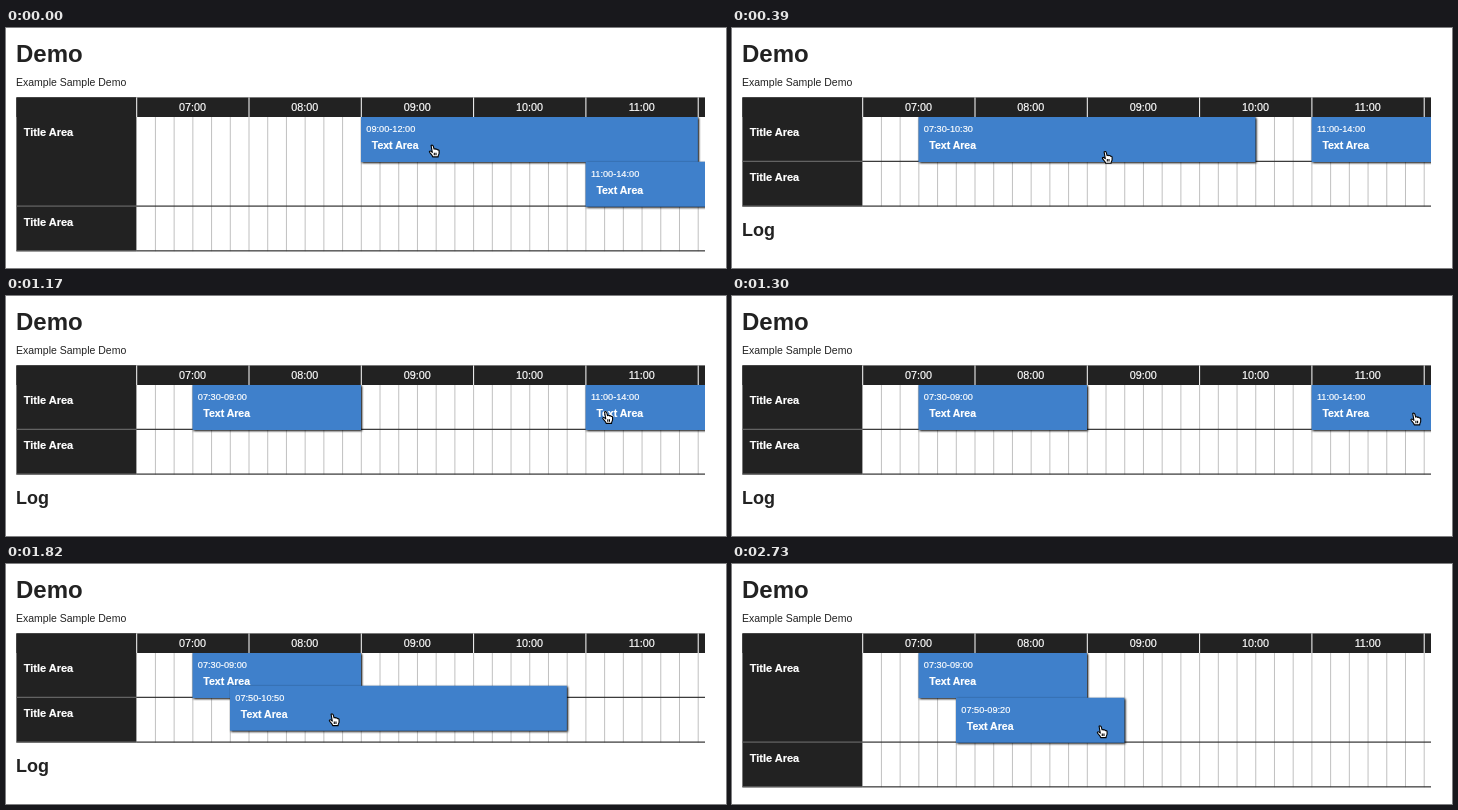
Animation of 720x240 px, one loop 2860 ms. Source, as an HTML page:

```html
<!DOCTYPE html>
<html lang="en">
<head>
<meta charset="utf-8">
<title>Schedule demo</title>
<style>
html, body { margin: 0; width: 100%; height: 100%; overflow: hidden; background: #fff; }
svg { display: block; font-family: "Liberation Sans", Arial, sans-serif; fill: #222; }
.bold { font-weight: bold; }
.white { fill: #fff; stroke: #fff; stroke-width: .2; }
.bar { fill: #3f80cb; filter: drop-shadow(1px 1.2px 1.3px #000); }
.hand { fill: #fff; stroke: #000; stroke-width: 1.1; stroke-linejoin: round; }
.resize { fill: #000; stroke: #fff; paint-order: stroke; }
</style>
</head>
<body>
<svg id="stage" width="720" height="240"></svg>
<script>
const stage = document.getElementById('stage');
const STEP = 130, STEPS = 22;
const LEFT = 10.4, GRID = 130.4, RIGHT = 699, HEAD = 69.4, TOP = 89;
const HOUR = 112.3, ROW = 44.75;

// Times are minutes after 07:00; from and to are steps of the loop.
const drags = [
  { bar: 0, from: 0, to: 2, by: -90, grab: 73, lift: 16, row: 0 },
  { bar: 0, from: 6, to: 8, by: -90, resize: true, row: 0 },
  { bar: 1, from: 10, to: 12, by: -170, grab: 104, lift: ROW, row: 1 },
  { bar: 1, from: 12, to: 14, by: -20, grab: 104, lift: -12, row: 0 },
  { bar: 1, from: 17.2, to: 20, by: -90, resize: true, row: 0 },
  { bar: 1, from: 21, to: 22, by: 0, grab: 146, row: 0 }
];

const snap = m => Math.round(m / 10) * 10;
const toX = m => GRID + m * HOUR / 60;
const two = v => String(v).padStart(2, '0');
const clock = m => two(7 + Math.floor(m / 60)) + ':' + two(m % 60);
const rect = (x, y, w, h, fill) =>
  `<rect x="${x}" y="${y}" width="${w}" height="${h}" fill="${fill}"/>`;
const text = (x, y, size, str, cls = '', anchor = 'start') =>
  `<text x="${x}" y="${y}" font-size="${size}" class="${cls}" text-anchor="${anchor}">${str}</text>`;

// Bars that overlap in one row are stacked, which makes the first row tall.
function settle(bars) {
  const [a, b] = bars;
  const tall = a.row === b.row && a.start < b.end && b.start < a.end;
  a.y = 0;
  b.y = tall || b.row ? ROW : 0;
  return tall;
}

function stateAt(n) {
  const bars = [{ start: 120, end: 300, row: 0 }, { start: 240, end: 420, row: 0 }];
  let tall = settle(bars);
  for (const d of drags) {
    if (n < d.from) break;
    const p = Math.min(1, (n - d.from) / (d.to - d.from)), bar = bars[d.bar];
    bar.end += d.by * p;
    if (!d.resize) bar.start += d.by * p;
    if (n <= d.to) {
      bar.y += (d.lift || 0) * p;
      break;
    }
    bar.row = d.row;
    tall = settle(bars);
  }
  return { bars, tall };
}

function grip(d, n) {
  const bar = stateAt(n).bars[d.bar];
  return d.resize
    ? { x: toX(bar.end), y: TOP + bar.y + 28 }
    : { x: toX(bar.start) + d.grab, y: TOP + bar.y + 34 };
}

// The pointer holds a bar while dragging and glides to the next grip otherwise.
function pointerAt(n) {
  const i = drags.findIndex(d => n <= d.to), next = drags[i];
  if (n >= next.from) return { ...grip(next, n), resize: next.resize };
  const last = drags[i - 1];
  const a = grip(last, last.to), b = grip(next, next.from);
  const p = (n - last.to) / (next.from - last.to), ease = 1 - (1 - p) ** 2;
  return { x: a.x + (b.x - a.x) * ease, y: a.y + (b.y - a.y) * ease };
}

function drawTable(rows, bottom) {
  let s = rect(LEFT, HEAD, RIGHT - LEFT, TOP - HEAD, '#222')
    + rect(LEFT, HEAD, GRID - LEFT, bottom - HEAD, '#222');
  for (let m = 10; toX(m) < RIGHT; m += 10)
    s += rect(toX(m) - .2, TOP, 1, bottom - TOP, '#c0c0c0');
  for (let m = 0; toX(m) < RIGHT; m += 60) {
    s += rect(toX(m) - .2, HEAD, 1, TOP - HEAD, '#fff');
    if (m < 300) s += text(toX(m + 30), 83, 10.8, clock(m), 'white', 'middle');
  }
  let y = TOP;
  for (const h of rows) {
    s += text(17.7, y + 19, 11, 'Title Area', 'bold white');
    y += h;
    s += rect(LEFT, y - 1, GRID - LEFT, 1.2, '#666')
      + rect(GRID, y - 1, RIGHT - GRID, 1.2, '#333');
  }
  return s;
}

function drawBar(bar) {
  const start = snap(bar.start), end = snap(bar.end);
  const x = toX(start), y = TOP + bar.y;
  return `<rect class="bar" x="${x}" y="${y}" width="${toX(end) - x}" height="45"/>`
    + text(x + 5.3, y + 15, 9.2, clock(start) + '-' + clock(end), 'white')
    + text(x + 10.8, y + 32, 10.5, 'Text Area', 'bold white');
}

function drawPointer({ x, y, resize }) {
  const shape = resize
    ? '<path class="resize" d="M-4-3h2v2h3v-2l4 3-4 3v-2h-3v2h-2z"/>'
    : '<path class="hand" d="M-3.4-5.2c.8-.8 1.9-.3 2.2.7l.8 3c.6-.6 1.5-.5 1.8.2.7-.5 1.5-.2 1.7.5'
      + '.8-.2 1.5.2 1.5 1.2v2.2c0 1-1 1.9-1 3.6h-5.4c-.3-1.6-1.9-2.8-3.2-4.6-.5-1 .6-1.7 1.6-.9l1.2.9z'
      + 'M-.2 2v2.5M1.5 2v2.5"/>';
  return `<g transform="translate(${x + .5} ${y - .3})">${shape}</g>`;
}

function draw(n) {
  const { bars, tall } = stateAt(n);
  const rows = [tall ? 2 * ROW : ROW, ROW];
  const bottom = TOP + rows[0] + rows[1];
  stage.innerHTML = text(10, 34, 24, 'Demo', 'bold')
    + text(10, 58, 10.5, 'Example Sample Demo')
    + drawTable(rows, bottom)
    + `<clipPath id="clip">${rect(GRID, TOP, RIGHT - GRID, bottom - TOP + .5, '#000')}</clipPath>`
    + `<g clip-path="url(#clip)">${bars.map(drawBar).join('')}</g>`
    + (tall ? '' : text(10, 208, 18, 'Log', 'bold'))
    + drawPointer(pointerAt(n));
}

let shown = -1;
const begin = performance.now();
function tick() {
  const n = Math.floor((performance.now() - begin) / STEP) % STEPS;
  if (n !== shown) draw(shown = n);
  requestAnimationFrame(tick);
}
tick();
</script>
</body>
</html>
```
